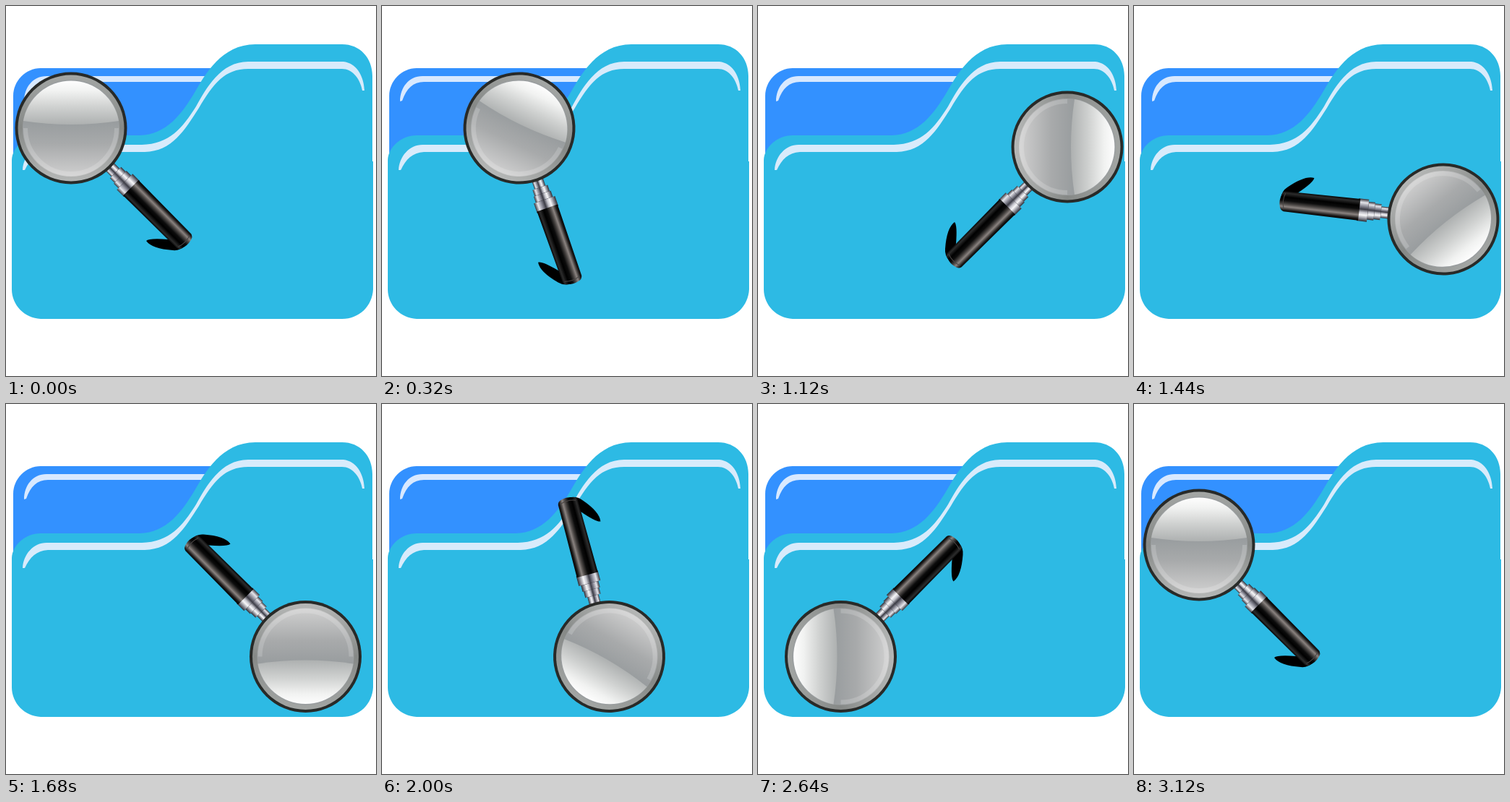
An HTML page with a canvas that plays this animation: 512x512 px, repeating every 3200 ms.

```html
<!DOCTYPE html>
<html lang="en">
<head>
<meta charset="utf-8">
<title>Folder search</title>
<style>
html, body { margin: 0; width: 100%; height: 100%; overflow: hidden; background: #fff; }
canvas { display: block; width: 512px; height: 512px; }
</style>
</head>
<body>
<canvas id="stage" width="512" height="512"></canvas>
<script>
const ctx = document.getElementById('stage').getContext('2d');
const STEP = 80, STEPS = 40, SPEED = 25;
const RAD = Math.PI / 180;

const folderBack = new Path2D('M10 215V124C10 104 27 86 48 86H300V215Z');
const folderFront = new Path2D(
  'M8 213C9 195 27 179 48 179H185C222 178 243 150 262 118' +
  'C275 96 298 53 345 53H465C490 53 507 72 507 97V215H508V392' +
  'C507 415 489 433 465 433H48C26 432 8 414 8 392Z');
const backLine = new Path2D(
  'M25 132C25 113 37 97 56 97H278L272 105H58C43 105 34 114 28 131Z');
const frontLine = new Path2D(
  'M23 227C24 208 38 192 56 192H188C226 191 244 169 263 139' +
  'C277 114 297 77 335 77H467C484 79 495 95 496 117L493 117' +
  'C490 100 479 87 465 87H335C303 87 287 107 267 141' +
  'C247 172 230 201 192 202H58C42 203 33 212 26 227Z');
const shadow = new Path2D('M104 156Q108 152 134 154L158 163Q150 170 141 169Q112 167 104 156Z');
const grip = new Path2D('M117 -15L221 -14Q226 -13 227 -7Q229 1 226 8Q225 14 220 14L117 15Z');
const gloss = new Path2D('M-66 -10Q0 0 66 -10A67 67 0 0 0 -66 -10Z');

function ramp(x0, y0, x1, y1, stops) {
  const g = ctx.createLinearGradient(x0, y0, x1, y1);
  stops.forEach(([at, color]) => g.addColorStop(at, color));
  return g;
}

function fill(path, style) {
  ctx.fillStyle = style;
  ctx.fill(path);
}

function disc(r, style) {
  ctx.beginPath();
  ctx.arc(0, 0, r, 0, Math.PI * 2);
  ctx.fillStyle = style;
  ctx.fill();
}

function softFill(path, style) {
  ctx.filter = 'blur(0.7px)';
  fill(path, style);
  ctx.filter = 'none';
}

function drawFolder() {
  fill(folderBack, '#3391ff');
  softFill(backLine, '#d8e9ff');
  fill(folderFront, '#2dbae4');
  softFill(frontLine, '#d8ebfb');
}

// One metal section of the neck, from a to b along the axis
function collar(a, b, half) {
  ctx.fillStyle = ramp(0, -half, 0, half, [
    [0, '#2c2c34'], [0.12, '#85858f'], [0.28, '#f8f8fa'], [0.4, '#c2c2ca'],
    [0.54, '#3c3c46'], [0.68, '#8c8c98'], [0.84, '#e6e6ec'], [1, '#34343c']
  ]);
  ctx.fillRect(a, -half, b - a, half * 2);
  ctx.fillStyle = '#303038';
  ctx.fillRect(b - 1.2, -half, 1.2, half * 2);
}

function drawHandle() {
  fill(shadow, '#000');
  ctx.save();
  ctx.rotate(45 * RAD);
  collar(74, 88, 8);
  collar(87, 97, 11);
  collar(96, 106, 12.5);
  collar(105, 119, 15.5);
  fill(grip, ramp(0, -15, 0, 15, [
    [0, '#000'], [0.1, '#1c1a19'], [0.26, '#8a8380'], [0.38, '#4c4846'],
    [0.54, '#0c0c0c'], [0.7, '#000'], [0.88, '#2c2c2c'], [1, '#000']
  ]));
  ctx.strokeStyle = '#4a4645';
  ctx.lineWidth = 1;
  ctx.beginPath();
  ctx.moveTo(221, -11);
  ctx.quadraticCurveTo(225, 0, 221, 11);
  ctx.stroke();
  ctx.restore();
}

function drawLens() {
  disc(77.5, '#282a28');
  disc(73.5, ramp(0, -73, 0, 73, [[0, '#a3a6a4'], [0.5, '#868987'], [1, '#b5b7b6']]));
  disc(67, ramp(0, -8, 0, 67, [[0, '#999d9f'], [0.4, '#a8aaab'], [1, '#d0d0d0']]));
  ctx.strokeStyle = 'rgba(255,255,255,.17)';
  ctx.lineWidth = 6;
  ctx.beginPath();
  ctx.arc(0, 0, 63, 0, Math.PI);
  ctx.stroke();
  fill(gloss, ramp(0, -67, 0, -4, [
    [0, '#fff'], [0.25, '#f1f2f1'], [0.6, '#cfd1d0'], [1, '#acafaf']
  ]));
}

// Clockwise tour of the folder, a quarter turn along each side
function pose(i) {
  if (i < 14) return [90 + SPEED * i, 169, 90 / 14 * i];
  if (i < 21) return [428, 195 + SPEED * (i - 14), 90 + 90 / 7 * (i - 14)];
  if (i < 34) return [414.5 - SPEED * (i - 21), 349.5, 180 + 7.5 * (i - 21)];
  return [90, 195 + SPEED * (39 - i), 360 - 90 / 7 * (39 - i)];
}

function draw(time) {
  const [x, y, turn] = pose(Math.floor(time / STEP) % STEPS);
  ctx.fillStyle = '#fff';
  ctx.fillRect(0, 0, 512, 512);
  drawFolder();
  ctx.save();
  ctx.translate(x, y);
  ctx.rotate(turn * RAD);
  drawHandle();
  drawLens();
  ctx.restore();
}

const start = performance.now();
function tick() {
  draw(performance.now() - start);
  requestAnimationFrame(tick);
}
tick();
</script>
</body>
</html>
```
